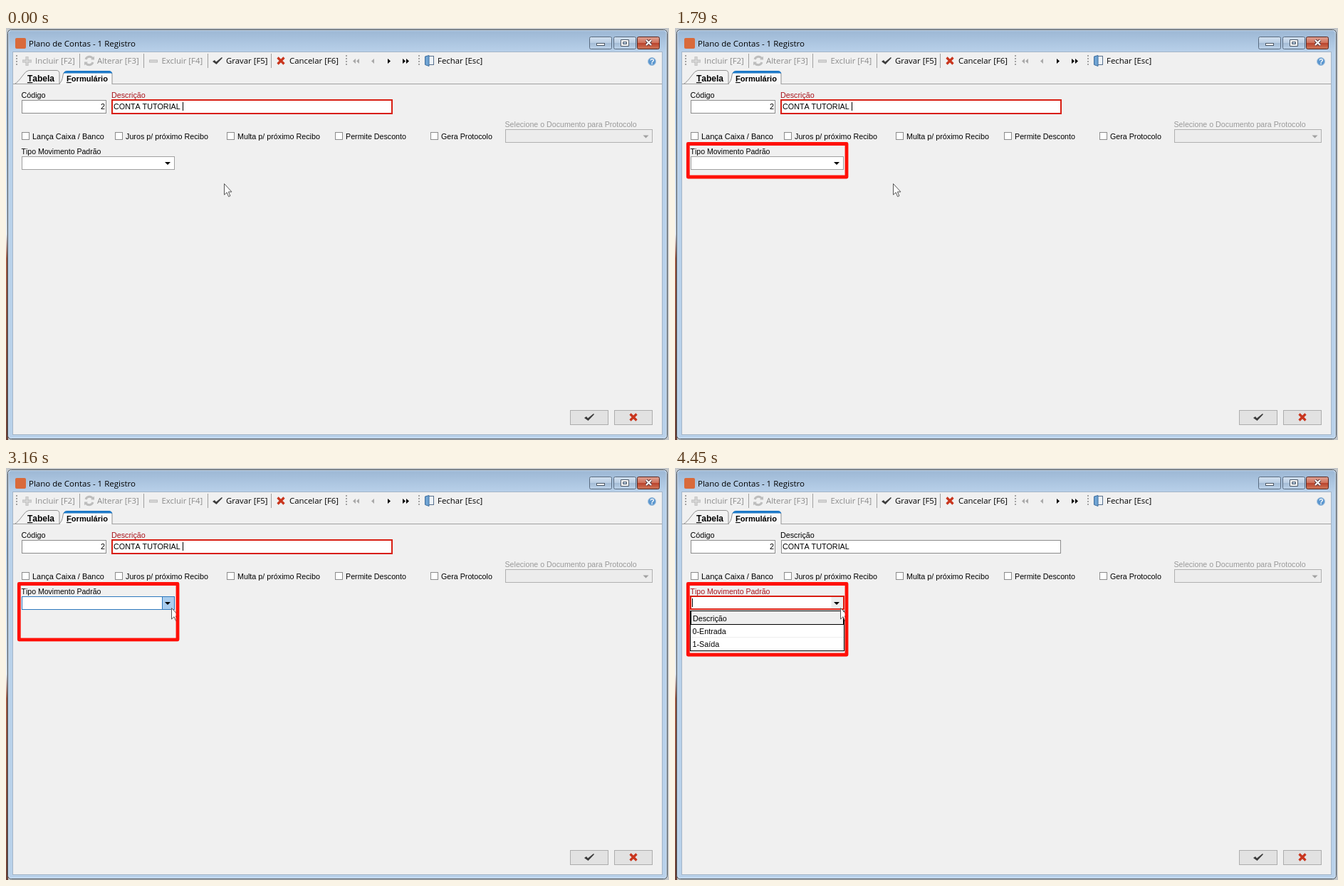
Animation, 931 px wide and 578 px high, one loop 4850 ms. Source, as an HTML page:

```html
<!DOCTYPE html>
<html lang="pt">
<head>
<meta charset="utf-8">
<title>Plano de Contas</title>
<style>
html, body { margin: 0; width: 100%; height: 100%; overflow: hidden; background: #f0f0f0; }
svg { display: block; width: 931px; height: 578px; }
text { font: 10.75px "Liberation Sans", Arial, sans-serif; font-kerning: none; white-space: pre; }
.ui text { font: 11.4px "Open Sans", "Noto Sans", sans-serif; }
.tab { font-size: 11.1px; font-weight: bold; }
.off { fill: #8b8b8b; }
.u { text-decoration: underline; }
.line { fill: none; stroke: #a0a0a0; }
.field { fill: #fff; stroke: #8c8c8c; }
.grip { stroke: #a3a3a3; stroke-width: 2; stroke-dasharray: 2 2; }
.btn { fill: #e2e2e2; stroke: #adadad; }
</style>
</head>
<body>
<svg viewBox="0 0 931 578">
  <defs>
    <linearGradient id="bar" x2="0" y2="1">
      <stop stop-color="#9cb7d4"/><stop offset="1" stop-color="#b9d1ea"/>
    </linearGradient>
    <linearGradient id="glass" x2="0" y2="1">
      <stop stop-color="#d3e1f0"/><stop offset=".5" stop-color="#b9cde3"/>
      <stop offset=".5" stop-color="#a3bbd5"/><stop offset="1" stop-color="#bdd3ea"/>
    </linearGradient>
    <linearGradient id="red" x2="0" y2="1">
      <stop stop-color="#e0a294"/><stop offset=".5" stop-color="#cf7059"/>
      <stop offset=".5" stop-color="#b9402a"/><stop offset="1" stop-color="#d07a5c"/>
    </linearGradient>
    <linearGradient id="edge" x2="0" y2="1">
      <stop stop-color="#c5c9cd"/><stop offset=".2" stop-color="#a9c3de"/>
      <stop offset=".5" stop-color="#d5dde6"/><stop offset=".56" stop-color="#9c5a45"/>
      <stop offset="1" stop-color="#6d4338"/>
    </linearGradient>
    <path id="tick" d="M-7 1l3-2 2 2.500 8-6.500 1 1-8.500 9z" fill="#3b3b3b"/>
    <path id="cross" d="M-4.500-4.500l9 9m0-9l-9 9" stroke="#c9351d" stroke-width="3.200"/>
  </defs>

  <!-- window frame -->
  <rect width="931" height="578" fill="#c3c6c9"/>
  <rect width="3" height="578" fill="url(#edge)"/>
  <rect x="2.500" y="2.500" width="926" height="574" rx="5" fill="#b9d1ea" stroke="#3f4953"/>
  <path d="M3 34V8q0-5 5-5h915q5 0 5 5v26z" fill="url(#bar)"/>
  <rect x="3.500" y="3.500" width="924" height="572" rx="4" fill="none" stroke="#d3e2f1"/>
  <rect x="9.500" y="33.500" width="912" height="537" fill="#f0f0f0" stroke="#a3b5c8"/>
  <rect x="13" y="14" width="15" height="15" rx="2" fill="#d96a3b"/>

  <g stroke="#596b80">
    <rect x="819.500" y="12.500" width="31" height="17" rx="2" fill="url(#glass)"/>
    <rect x="853.500" y="12.500" width="31" height="17" rx="2" fill="url(#glass)"/>
    <rect x="886.500" y="12.500" width="31" height="17" rx="2" fill="url(#red)" stroke="#55251f"/>
    <g fill="#fff" stroke="#4c5866">
      <rect x="829.500" y="21.500" width="11" height="3"/>
      <path d="M863.500 16.500h11v9h-11zm3 3v3h5v-3z" fill-rule="evenodd"/>
    </g>
    <path d="M899 17l7 7m0-7l-7 7" stroke="#51343a" stroke-width="4"/>
    <path d="M899 17l7 7m0-7l-7 7" stroke="#fff" stroke-width="2.200"/>
  </g>

  <!-- toolbar -->
  <g class="ui">
    <text x="32" y="26" style="font-size:11.500px">Plano de Contas - 1 Registro</text>
    <text x="41" y="50" class="off">Incluir [F2]</text>
    <text x="128" y="50" class="off">Alterar [F3]</text>
    <text x="218.500" y="50" class="off">Excluir [F4]</text>
    <text x="309" y="50">Gravar [F5]</text>
    <text x="398" y="50">Cancelar [F6]</text>
    <text x="606" y="50">Fechar [Esc]</text>
  </g>
  <path class="grip" d="M15 38v16M478 38v16M580 38v16"/>
  <path class="line" d="M103.500 36v20M193.500 36v20M283.500 36v20M372.500 36v20"/>
  <g fill="none" stroke="#bdbdbd">
    <path d="M23 46.500h13M29.500 40v13" stroke-width="4"/>
    <path d="M23.500 46.500h12M29.500 40.500v12" stroke="#dedede" stroke-width="1.500"/>
    <path d="M112 44a5.500 5.500 0 0 1 10-1M122 48a5.500 5.500 0 0 1-10 1" stroke-width="3"/>
    <path d="M119 44.500h5v-5zM115 47.500h-5v5z" fill="#bdbdbd" stroke="none"/>
    <path d="M201 46.500h12" stroke-width="4"/>
    <path d="M202 46.500h10" stroke="#dedede" stroke-width="1.500"/>
  </g>
  <use href="#tick" x="297" y="46"/>
  <use href="#cross" x="386" y="46"/>
  <path d="M491 43v7l-4-3.500zM496 43v7l-4-3.500zM517 43v7l-4-3.500z" fill="#a9a9a9"/>
  <path d="M536 43v7l4-3.500zM557 43v7l4-3.500zM562 43v7l4-3.500z"/>
  <rect x="590.500" y="39.500" width="10" height="12" fill="#eef3f8" stroke="#58718e"/>
  <path d="M588.500 40l5.500-1.500v15l-5.500-2z" fill="#6fa3d3" stroke="#3d6c9c"/>
  <circle cx="907" cy="47" r="5.500" fill="#5b97cf" stroke="#a9c4de"/>
  <text x="904" y="51" style="font-weight:bold;fill:#fff">?</text>

  <!-- tabs -->
  <path d="M10 78.500h2Q16 77 24 66q4-6 8-6.500h39q4 0 4 5v14" fill="#f2f2f2" stroke="#929292"/>
  <path d="M74 78.500Q79 76 80 66q1-5 5-5h60q4 0 4 4v14" fill="#f8f8f8" stroke="#929292"/>
  <path d="M81 63.500q1-3 5-3h59q3 0 4 3" fill="#1c79c8" stroke="#1c79c8"/>
  <path d="M83 64h64v4H82z" fill="#f8f8f8"/>
  <path class="line" d="M10 78.500h66M149 78.500h772"/>
  <text x="30" y="75" class="tab" style="font-size:12px"><tspan class="u">T</tspan>abela</text>
  <text x="85" y="75" class="tab"><tspan class="u">F</tspan>ormulário</text>

  <!-- form -->
  <text x="21.500" y="98">Código</text>
  <text x="148" y="98" id="descLabel">Descrição</text>
  <rect class="field" x="22.500" y="101.500" width="118" height="18"/>
  <text x="133" y="114">2</text>
  <rect id="desc" fill="#fff"/>
  <text x="151" y="113.500">CONTA TUTORIAL</text>
  <path id="descCaret" d="M248.500 104v12" stroke="#000"/>
  <g id="checks"></g>
  <text x="700.500" y="139" fill="#999" style="font-size:10.650px">Selecione o Documento para Protocolo</text>
  <rect x="701.500" y="142.500" width="206" height="18" fill="#ececec" stroke="#b0b0b0"/>
  <path d="M894.500 150.500h8l-4 4z" fill="#a0a0a0"/>
  <text x="21.500" y="177" id="typeLabel" style="font-size:10.550px">Tipo Movimento Padrão</text>
  <rect x="22" y="180" width="215" height="19" fill="#fff"/>
  <rect id="drop" x="219.500" y="180.500" width="17" height="18"/>
  <rect id="combo" fill="none"/>
  <path d="M223 188h8l-4 4z"/>
  <path id="typeCaret" d="M24.500 183v12" stroke="#000"/>
  <g id="list">
    <rect x="21.500" y="200.500" width="216" height="56" fill="#fff" stroke="#000"/>
    <rect x="22.500" y="200.500" width="214" height="19" fill="#efefef" stroke="#000"/>
    <path d="M22 237.500h215" stroke="#eee"/>
    <text x="25" y="215">Descrição</text>
    <text x="24.500" y="233">0-Entrada</text>
    <text x="24.500" y="251">1-Saída</text>
  </g>

  <rect class="btn" x="792.500" y="536.500" width="53" height="20"/>
  <rect class="btn" x="854.500" y="536.500" width="53" height="20"/>
  <use href="#tick" x="819" y="546"/>
  <use href="#cross" x="881" y="546"/>

  <path id="mouse" d="M.5.500v15.500l3.600-3.300 2.500 5.800 2.300-1-2.500-5.600h4.600z" fill="#fff" stroke="#555"/>
  <path id="mark" fill="none" stroke="#ff1008" stroke-width="4.800" stroke-linecap="round" stroke-linejoin="round"/>
</svg>
<script>
const LOOP = 4850;
const $ = id => document.getElementById(id);
const set = (id, attrs) => {
  for (const k in attrs) $(id).setAttribute(k, attrs[k]);
};
const show = (id, on) => set(id, { visibility: on ? "visible" : "hidden" });
const clamp = v => Math.min(1, Math.max(0, v));
const smooth = u => u * u * (3 - 2 * u);
// Progress from a to b, held on n evenly spaced pictures
const stepped = (t, a, b, n) => Math.floor(clamp((t - a) / (b - a)) * (n - 1) + 1e-6) / (n - 1);

$("checks").innerHTML = [
  [22, "Lança Caixa / Banco", 10.95],
  [153, "Juros p/ próximo Recibo", 10.75],
  [310, "Multa p/ próximo Recibo", 10.75],
  [462, "Permite Desconto", 10.7],
  [596, "Gera Protocolo", 10.7]
].map(([x, label, size]) =>
  `<rect class="field" x="${x + .5}" y="146.5" width="10" height="10"/>
   <text x="${x + 15}" y="156" style="font-size:${size}px">${label}</text>`).join("");

function frame(id, x, y, w, h, color, width) {
  const d = width / 2;
  set(id, { x: x + d, y: y + d, width: w - width, height: h - width, stroke: color, "stroke-width": width });
}

function drawMark(t) {
  const bottom = 209 + 53 * stepped(t, 2890, 3230, 6);
  const len = 11 + 532 * stepped(t, 70, 1130, 16);
  set("mark", {
    d: `M18.300 162.500V${bottom}H241V162.500H18.300${t >= 1130 ? "Z" : ""}`,
    "stroke-dasharray": t < 1130 ? `${len} 999` : "none"
  });
  show("mark", t >= 70);
}

function drawMouse(t) {
  const tick = t < 2400 ? 0 : 2400 + Math.floor((t - 2400) / 70) * 70;
  const s = smooth(clamp((tick - 2350) / 570));
  set("mouse", { transform: `translate(${Math.round(306 - 74 * s)} ${Math.round(218 - 22 * s)})` });
}

function drawForm(t) {
  const left = t >= 3300, open = t >= 3370, hover = t >= 2890 && !open;
  if (left) frame("desc", 149, 101, 393, 19, open ? "#8c8c8c" : "#b3261e", 1);
  else frame("desc", 148, 100, 395, 21, "#d81e12", 2);
  set("descLabel", { fill: left ? "#000" : "#a8141c" });
  show("descLabel", !left || open);
  show("descCaret", !left);

  if (open) frame("combo", 21, 179, 217, 20, "#d81e12", 2);
  else frame("combo", 22, 180, 215, 19, hover ? "#2d78bd" : "#a0a0a0", 1);
  set("drop", {
    fill: hover ? "#a9cdee" : open ? "#ececec" : "#fff",
    stroke: hover ? "#2d78bd" : "none"
  });
  set("typeLabel", { fill: open ? "#a8141c" : "#000" });
  show("typeCaret", open && (t < 3910 || t >= 4450));
  show("list", open);
}

function draw(now) {
  const t = now % LOOP;
  drawMark(t);
  drawMouse(t);
  drawForm(t);
}

const start = performance.now();
function tick() {
  draw(performance.now() - start);
  requestAnimationFrame(tick);
}
tick();
</script>
</body>
</html>
```
